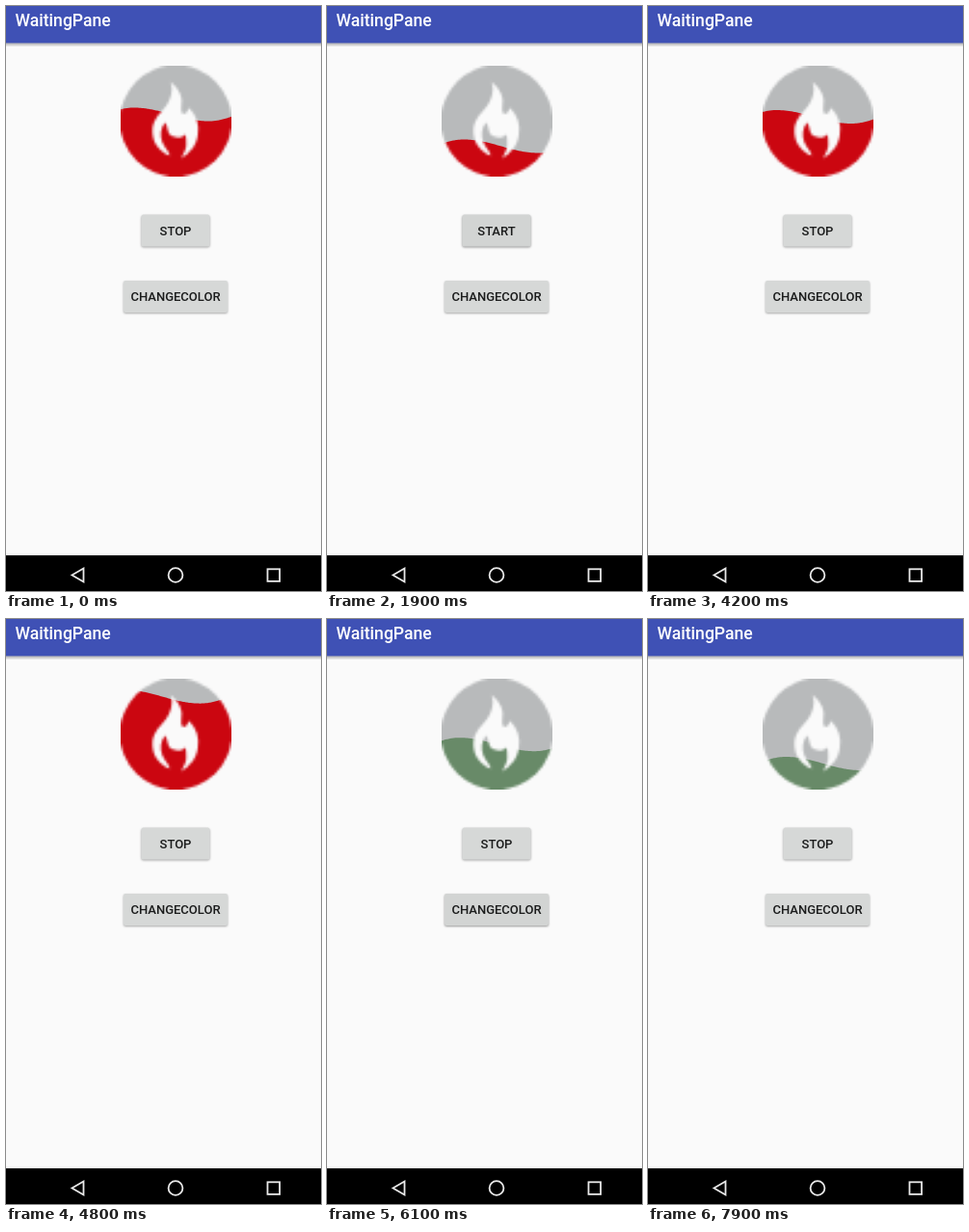
An HTML page with a canvas for the animation above (8000 ms loop, 327x607 px).

```html
<!DOCTYPE html>
<html lang="en">
<head>
<meta charset="utf-8">
<style>
  html, body { margin: 0; width: 327px; height: 607px; overflow: hidden; background: #fafafa; }
  svg, canvas { position: absolute; left: 0; top: 0; }
  canvas { left: 119px; top: 62px; }
  text { font: 500 13px Roboto, sans-serif; fill: #1b1c1c; text-anchor: middle; }
  .title { font-size: 17.6px; fill: #fff; text-anchor: start; }
  .button { fill: #d6d8d7; filter: drop-shadow(0 1px 0.8px #0005); }
  .button.pressed { fill: #d2d4d3; filter: drop-shadow(0 1px 1.2px #0006); }
  .nav { fill: none; stroke: #e8e8e8; stroke-width: 1.8; }
</style>
</head>
<body>
<svg width="327" height="607">
  <defs>
    <linearGradient id="shade" x2="0" y2="1">
      <stop stop-color="#000" stop-opacity=".3"/>
      <stop offset="1" stop-color="#000" stop-opacity="0"/>
    </linearGradient>
  </defs>
  <rect width="327" height="38.5" fill="#3f51b5"/>
  <rect y="38.5" width="327" height="4" fill="url(#shade)"/>
  <text class="title" x="9.5" y="21.3">WaitingPane</text>
  <rect id="toggle" class="button" x="140.5" y="216.5" width="71" height="33" rx="2"/>
  <text id="label" x="176" y="238">STOP</text>
  <rect id="recolor" class="button" x="122" y="285" width="108" height="33" rx="2"/>
  <text x="176" y="306.3">CHANGECOLOR</text>
  <rect y="570" width="327" height="37"/>
  <g class="nav">
    <path d="M68.5 590.5L80.5 583.5V597.5Z"/>
    <circle cx="176" cy="590.5" r="7.4"/>
    <rect x="271.5" y="584.3" width="12.6" height="12.6"/>
  </g>
</svg>
<canvas id="badge" width="115" height="115"></canvas>
<script>
const LOOP = 8000, STEP = 100;
const SIZE = 115, LEFT = 119, TOP = 62;
const TOP_LEVEL = 62, SPAN = 121;      // the liquid restarts below the badge
const AMP = 7, FALL = 78, RISE = 60;   // widths of the falling and rising wave halves
// [time, water line], still to be wrapped into SPAN
const LEVELS = [[0, 112.5], [1000, 60.9], [1700, 24.5], [3600, 24.5], [4200, -6],
                [5300, -69], [7000, -160], [7900, -213], [8000, -218]];
const FLAME = new Path2D(`M171 79C180 86 184 95 182 104C181 111 184 114 187 111
  C189 109 189 107 190 106C198 114 201 124 199 134C198 145 190 153 182 158
  C185 152 188 147 187 141C187 138 187 136 186 133C182 138 172 137 169 132
  C167 128 168 125 165 121C160 127 160 135 162 141C164 147 169 150 170 155
  C160 152 152 142 152 130C152 118 159 113 166 104C171 97 174 88 171 79Z`);

const $ = id => document.getElementById(id);
const mod = (a, b) => (a % b + b) % b;
const ctx = $('badge').getContext('2d');
const mask = makeMask();

// A coarse bitmap, so that the enlarged edges look stepped
function makeMask() {
  const c = document.createElement('canvas');
  c.width = c.height = 46;
  const m = c.getContext('2d');
  m.scale(46 / SIZE, 46 / SIZE);
  m.translate(-LEFT, -TOP);
  m.beginPath();
  m.arc(176.3, 119.3, 58, 0, 7);
  m.fill();
  m.globalCompositeOperation = 'destination-out';
  m.fill(FLAME);
  return c;
}

function levelAt(t) {
  const i = LEVELS.findIndex(k => k[0] > t);
  const [t0, a] = LEVELS[i - 1], [t1, b] = LEVELS[i];
  return TOP_LEVEL + mod(a + (b - a) * (t - t0) / (t1 - t0) - TOP_LEVEL, SPAN);
}

function waveY(x, level) {
  const crest = 133 + (level - 114) * 0.28;
  const d = mod(x - crest, FALL + RISE);
  const phase = d < FALL ? d / FALL : 1 + (d - FALL) / RISE;
  return level - AMP * Math.cos(Math.PI * phase);
}

function drawBadge(level, color) {
  ctx.globalCompositeOperation = 'source-over';
  ctx.fillStyle = '#b8babb';
  ctx.fillRect(0, 0, SIZE, SIZE);
  ctx.fillStyle = color;
  ctx.beginPath();
  ctx.moveTo(0, SIZE + 20);
  for (let x = 0; x <= SIZE; x++) ctx.lineTo(x, waveY(x + LEFT, level) - TOP);
  ctx.lineTo(SIZE, SIZE + 20);
  ctx.fill();
  ctx.globalCompositeOperation = 'destination-in';
  ctx.drawImage(mask, 0, 0, SIZE, SIZE);
}

function frame(now) {
  const t = Math.floor(now % LOOP / STEP) * STEP;
  drawBadge(levelAt(t), t < 6000 ? '#cb0610' : '#688a68');
  $('label').textContent = t >= 1900 && t < 3700 ? 'START' : 'STOP';
  $('toggle').classList.toggle('pressed', t >= 1700 && t < 3800);
  $('recolor').classList.toggle('pressed', t >= 5900 && t < 6200);
  requestAnimationFrame(frame);
}
requestAnimationFrame(frame);
</script>
</body>
</html>
```
